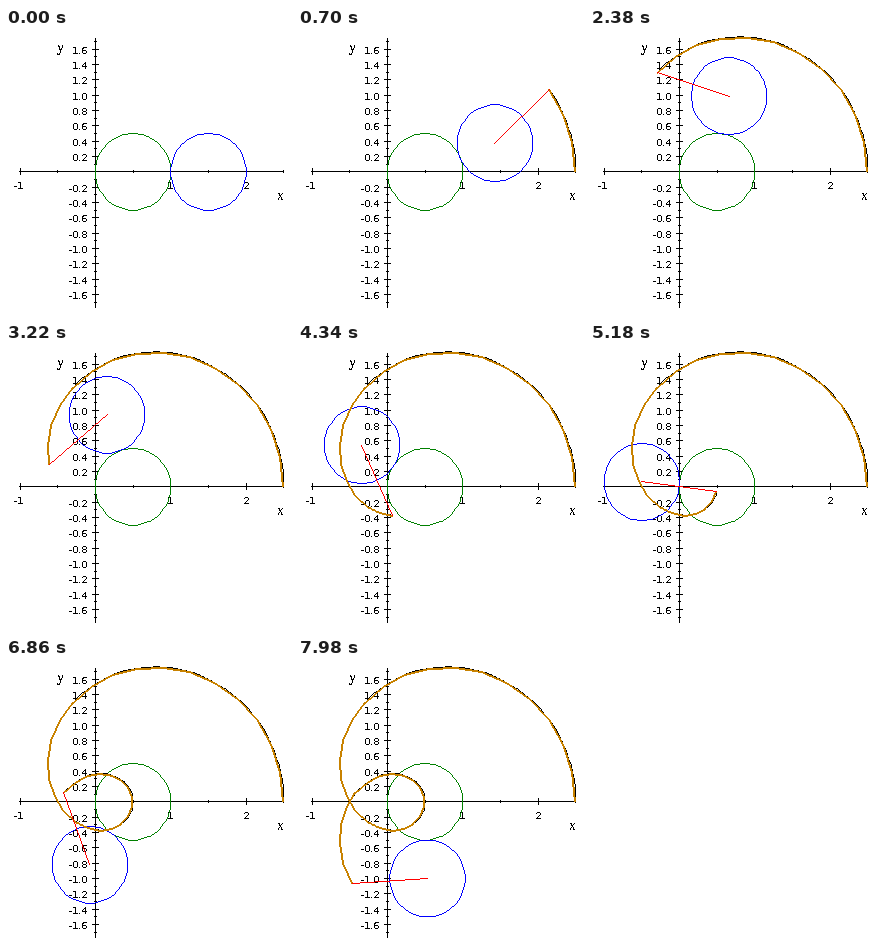
Animation, 286 px wide and 287 px high, one loop 8 s. Source, as a matplotlib script:

```python
import numpy as np
import matplotlib.pyplot as plt
from matplotlib.animation import FuncAnimation

W, H, DPI = 286, 287, 100
PX = 72 / DPI
X0, Y0 = 88.9, 143.4        # origin in pixels
SX, SY = 75.4, 76.7         # pixels per unit
LOOP, TICK = 8000, 10       # ms
STEPS_PER_TURN = 49
HOLD, STEP = 70, 210        # extra pause every 16 steps, regular step
BLOCK = 16 * STEP + HOLD

BLACK, GREEN, BLUE = (0, 0, 0), (0, 128, 0), (0, 0, 255)
RED, ORANGE = (255, 0, 0), (200, 130, 0)

plt.rcParams.update({"toolbar": "None", "text.antialiased": False,
                     "text.hinting": "default", "text.hinting_factor": 1})
fig = plt.figure(figsize=(W / DPI, H / DPI), dpi=DPI, facecolor="white")
ax = fig.add_axes([0, 0, 1, 1])
ax.axis("off")


def to_px(x, y):
    """Nearest pixel column and row of points in the plane."""
    cols, rows = X0 + SX * np.asarray(x), Y0 - SY * np.asarray(y)
    return np.rint(cols).astype(int), np.rint(rows).astype(int)


def stroke(canvas, color, cols, rows, thick=False):
    """Draw a crisp polyline, one or two pixels wide."""
    for x, y, x2, y2 in zip(cols, rows, cols[1:], rows[1:]):
        dx, dy = x2 - x, y2 - y
        n = max(abs(dx), abs(dy))
        s = np.linspace(0, 1, n + 1)
        xs = np.rint(x + s * dx).astype(int)
        ys = np.rint(y + s * dy).astype(int)
        canvas[ys, xs] = (*color, 255)
        if thick and abs(dx) > abs(dy):
            canvas[ys + 1, xs] = (*color, 255)
        elif thick:
            canvas[ys, xs - 1] = (*color, 255)


def label(x, baseline, text, size=10, family="DejaVu Sans", ha="center"):
    ax.text(x, baseline, text, fontsize=size * PX, family=family, ha=ha,
            va="baseline", color="black", zorder=1)


def circle(cx, cy, r=0.5):
    a = np.linspace(0, 2 * np.pi, 73)
    return to_px(cx + r * np.cos(a), cy + r * np.sin(a))


def centre(t):
    return 0.5 + np.cos(t), np.sin(t)


def pen(t):
    cx, cy = centre(t)
    return cx + np.cos(2 * t), cy + np.sin(2 * t)


def tick_half(k, every):
    return 3 if k % every == 0 else 1


def draw_axes(canvas):
    ox, oy = to_px(0, 0)
    stroke(canvas, BLACK, [13, 277], [oy, oy])
    stroke(canvas, BLACK, [ox, ox], [10, 279])
    for k in range(-2, 6):
        x, half = to_px(k / 2, 0)[0], tick_half(k, 2)
        stroke(canvas, BLACK, [x, x], [oy - half, oy + half])
    for k in range(-17, 18):
        y, half = to_px(0, k / 10)[1], tick_half(k, 2)
        stroke(canvas, BLACK, [ox - half, ox + half], [y, y])
        if k % 2 == 0 and k:
            label(81, y + 5, f"{k / 10:.1f}", ha="right")
    for text, x in (("-1", 12.5), ("1", 164), ("2", 240)):
        label(x, 161, text)
    label(54.5, 24, "y", 15, "Liberation Serif")
    label(274.5, 172, "x", 15, "Liberation Serif")


def draw_pose(background, step):
    canvas = background.copy()
    t = 2 * np.pi * step / STEPS_PER_TURN
    stroke(canvas, BLUE, *circle(*centre(t)))
    if step:
        smooth = np.linspace(0, t, 4 * step + 1)
        stroke(canvas, BLACK, *to_px(*pen(smooth)))
        stroke(canvas, ORANGE, *to_px(*pen(smooth[::4])), thick=True)
        (cx, cy), (px, py) = centre(t), pen(t)
        stroke(canvas, RED, *to_px([cx, px], [cy, py]))
    return canvas


def step_at(ms):
    block, rest = divmod(ms, BLOCK)
    return 16 * block + max(0, (rest - HOLD) // STEP)


background = np.zeros((H, W, 4), np.uint8)
draw_axes(background)
stroke(background, GREEN, *circle(0.5, 0))
poses = [draw_pose(background, s) for s in range(step_at(LOOP - TICK) + 1)]
picture = ax.imshow(poses[0], extent=(0, W, H, 0), aspect="auto",
                    interpolation="nearest", zorder=2)
ax.set_xlim(0, W)
ax.set_ylim(H, 0)


def update(frame):
    picture.set_data(poses[step_at(frame * TICK)])
    return picture,


anim = FuncAnimation(fig, update, frames=LOOP // TICK, interval=TICK,
                     repeat=True, repeat_delay=0, blit=False)
plt.show()
```
